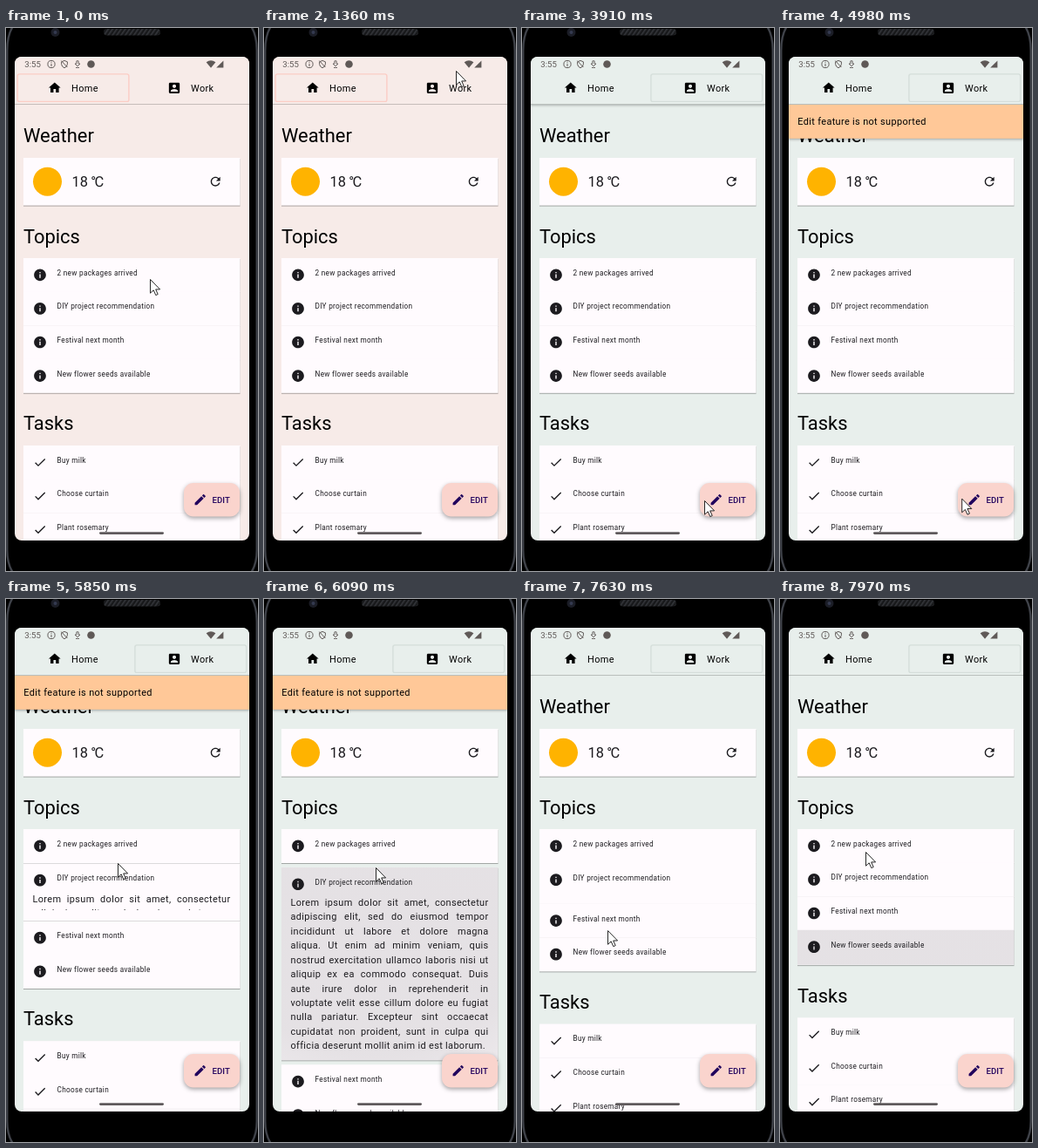
Recreate the animation shown at these times as an HTML page. Size 289 by 623 pixels, loop 8 s.

```html
<!DOCTYPE html>
<html lang="en">
<head>
<meta charset="utf-8">
<title>Phone screen</title>
<style>
html, body { margin: 0; width: 100%; height: 100%; overflow: hidden; background: #000; }
svg { display: block; }
#stage { width: 289px; height: 623px; }
text, .body { font-family: Roboto, "Noto Sans CJK JP", "Noto Sans CJK SC", "Noto Sans CJK", sans-serif; }
text { fill: #1c1b1f; }
.h { font-size: 21.9px; fill: #000; }
.tab { font-size: 10.95px; letter-spacing: .34px; fill: #000; }
.row { font-size: 8.21px; letter-spacing: .3px; }
.card { fill: #fffbfe; filter: drop-shadow(0 1px .7px rgba(0,0,0,.3)); }
.body { font-size: 10.95px; line-height: 16.43px; letter-spacing: .34px; color: #1c1b1f; width: 227px; }
.body div { height: 16.43px; text-align: justify; text-align-last: justify; }
.body div:last-child { text-align-last: left; white-space: nowrap; }
</style>
</head>
<body>
<svg id="stage" viewBox="0 0 289 623" xmlns="http://www.w3.org/2000/svg">
  <defs>
    <clipPath id="screen"><rect x="10" y="33" width="269" height="555" rx="8"/></clipPath>
    <clipPath id="below"><rect x="10" y="88" width="269" height="500"/></clipPath>
    <clipPath id="fabClip"><rect x="204" y="522" width="64" height="38.4" rx="11"/></clipPath>
    <radialGradient id="ink">
      <stop offset=".7" stop-color="#1c1b1f" stop-opacity=".115"/>
      <stop offset="1" stop-color="#1c1b1f" stop-opacity=".06"/>
    </radialGradient>
    <pattern id="mesh" width="4" height="4" patternUnits="userSpaceOnUse" patternTransform="rotate(35)">
      <rect width="4" height="4" fill="#17181a"/><rect width="1.6" height="4" fill="#34363a"/>
    </pattern>
  </defs>

  <rect width="289" height="623" fill="#000"/>
  <g fill="none" stroke="#3f4249" stroke-width="2.4">
    <path d="M8 -2C4 4 1.3 13 1.3 26V599C1.3 610 4 619 8 625"/>
    <path d="M281 -2C285 4 287.7 13 287.7 26V599C287.7 610 285 619 281 625"/>
  </g>
  <circle cx="56.5" cy="5" r="5" fill="#1b1d26"/>
  <circle cx="56.5" cy="5" r="2" fill="#343a50"/>
  <rect x="112" y="1" width="65" height="7.5" rx="3.7" fill="url(#mesh)"/>

  <g clip-path="url(#screen)">
    <rect id="bg" x="10" y="33" width="269" height="555"/>
    <g id="list"></g>
    <g clip-path="url(#below)">
      <g id="note">
        <rect x="10" y="87.5" width="269" height="39.3" fill="#ffc898" style="filter:drop-shadow(0 1.4px 1.4px rgba(0,0,0,.33))"/>
        <text class="tab" x="20.3" y="111">Edit feature is not supported</text>
      </g>
    </g>
    <rect id="bar" x="10" y="33" width="269" height="54.5"/>
    <rect x="10" y="87" width="269" height="1" fill="#000" opacity=".2"/>
    <rect id="mark" y="52.9" height="31.5" rx="2.2" fill="none" stroke-width="1.37"/>
    <g id="tabs"></g>
    <g fill="#5f5957">
      <text x="21.3" y="45" style="font-size:9.6px;fill:#5f5957">3:55</text>
      <g fill="none" stroke="#5f5957">
        <circle cx="52" cy="41.5" r="4.1"/>
        <path d="M52 40.8V44M52 38.8V39.8"/>
        <path d="M67 37.4L70.4 38.8V41.6Q70 44.6 67 45.8Q64 44.6 63.6 41.6V38.8ZM63.4 37.6L70.4 45"/>
        <path stroke-width=".9" d="M80.9 37.8H83.1V41H85L82 43.9L79 41H80.9ZM80 45.5H84"/>
      </g>
      <circle cx="97.5" cy="41.5" r="4.3"/>
      <path d="M229.6 39.2Q235 35.2 240.4 39.2L235 45.8Z"/>
      <path d="M241.2 45.6L249.4 37.4V45.6Z"/>
    </g>
    <g>
      <rect x="204" y="522" width="64" height="38.4" rx="11" fill="#fad4cd" style="filter:drop-shadow(0 2.8px 2.8px rgba(0,0,0,.36))"/>
      <g clip-path="url(#fabClip)"><circle id="fabInk" cx="212" cy="543" fill="url(#ink)"/></g>
      <g id="pen"></g>
      <text x="236.5" y="544.7" style="font-size:9.58px;font-weight:500;letter-spacing:.07px;fill:#21005d">EDIT</text>
    </g>
    <rect x="107" y="578.2" width="74" height="2.8" rx="1.4" fill="#5e595b"/>
  </g>
  <path id="cursor" d="M.5 .5V16.2L4.2 12.8L6.8 18.6L9.2 17.5L6.7 11.9H11.6Z" fill="#fff" stroke="#111" stroke-width=".9"/>
</svg>
<script>
const $ = id => document.getElementById(id);
const ICONS = {
  home: 'M10 20v-6h4v6h5v-8h3L12 3 2 12h3v8z',
  work: 'M3 5v14c0 1.1.89 2 2 2h14c1.1 0 2-.9 2-2V5c0-1.1-.9-2-2-2H5c-1.11 0-2 .9-2 2zm12 4c0 1.66-1.34 3-3 3s-3-1.34-3-3 1.34-3 3-3 3 1.34 3 3zm-9 8c0-2 4-3.1 6-3.1s6 1.1 6 3.1v1H6v-1z',
  info: 'M12 2C6.48 2 2 6.48 2 12s4.48 10 10 10 10-4.48 10-10S17.52 2 12 2zm1 15h-2v-6h2v6zm0-8h-2V7h2v2z',
  check: 'M9 16.17 4.83 12l-1.42 1.41L9 19 21 7l-1.41-1.41z',
  reload: 'M17.65 6.35C16.2 4.9 14.21 4 12 4c-4.42 0-7.99 3.58-7.99 8s3.57 8 7.99 8c3.73 0 6.84-2.55 7.73-6h-2.08c-.82 2.33-3.04 4-5.65 4-3.31 0-6-2.69-6-6s2.69-6 6-6c1.66 0 3.14.69 4.22 1.78L13 11h7V4l-2.35 2.35z',
  pen: 'M3 17.25V21h3.75L17.81 9.94l-3.75-3.75L3 17.25zM20.71 7.04c.39-.39.39-1.02 0-1.41l-2.34-2.34c-.39-.39-1.02-.39-1.41 0l-1.83 1.83 3.75 3.75 1.83-1.83z'
};
const LOREM = `Lorem ipsum dolor sit amet, consectetur
adipiscing elit, sed do eiusmod tempor
incididunt ut labore et dolore magna
aliqua. Ut enim ad minim veniam, quis
nostrud exercitation ullamco laboris nisi ut
aliquip ex ea commodo consequat. Duis
aute irure dolor in reprehenderit in
voluptate velit esse cillum dolore eu fugiat
nulla pariatur. Excepteur sint occaecat
cupidatat non proident, sunt in culpa qui
officia deserunt mollit anim id est laborum.`;
const TOPICS = ['2 new packages arrived', 'DIY project recommendation', 'Festival next month', 'New flower seeds available'];
const TASKS = ['Buy milk', 'Choose curtain', 'Plant rosemary'];
const LOOP = 8000, ROW = 38.6, GROW = 187.5, GAP = 5.5;
const LAP = .4; // cards overlap a little so that no seam shows between rows

const icon = (name, x, y, fill = '#1c1b1f') =>
  `<path fill="${fill}" transform="translate(${x - 8.21} ${y - 8.21}) scale(.6845)" d="${ICONS[name]}"/>`;
const label = (cls, x, y, s) => `<text class="${cls}" x="${x}" y="${y}">${s}</text>`;

// Rows are drawn relative to their own top edge.
const row = (s, name, inner = '') => `<g class="item">
  <rect class="card" x="20" width="248.5" height="${ROW + LAP}"/>${inner}
  ${icon(name, 39, 19.3)}${label('row', 58.5, 19.8, s)}</g>`;
const topicInner = `<svg class="clip" x="20" y="0" width="248.5" height="${ROW}" overflow="hidden">
    <circle class="ink" fill="url(#ink)"/></svg>
  <svg class="text" x="30.5" y="33.5" width="230" height="0" overflow="hidden">
    <foreignObject width="230" height="184"><div xmlns="http://www.w3.org/1999/xhtml" class="body">${
      LOREM.split('\n').map(s => `<div>${s}</div>`).join('')}</div></foreignObject></svg>`;

$('list').innerHTML = label('h', 20, 131.4, 'Weather') +
  '<rect class="card" x="20" y="149" width="248.5" height="54.6"/><circle cx="47.5" cy="176.2" r="16.5" fill="#ffb300"/>' +
  '<text x="75.5" y="182" style="font-size:16.4px">18 ℃</text>' + icon('reload', 240.2, 176.2) +
  label('h', 20, 246.8, 'Topics') +
  `<g id="topics">${TOPICS.map(s => row(s, 'info', topicInner)).join('')}</g>` +
  `<g id="tasks">${label('h', 20, 461.2, 'Tasks')}${TASKS.map(s => row(s, 'check')).join('')}</g>`;
$('tabs').innerHTML = icon('home', 55.8, 68.6, '#000') + label('tab', 75, 72.6, 'Home') +
  icon('work', 193, 68.8, '#000') + label('tab', 212, 72.6, 'Work');
$('pen').innerHTML = icon('pen', 222.7, 541.2, '#21005d');

const rows = [...$('topics').children].map(g => ({
  g, card: g.querySelector('.card'), clip: g.querySelector('.clip'),
  ink: g.querySelector('.ink'), text: g.querySelector('.text')
}));
[...$('tasks').querySelectorAll('.item')].forEach((g, i) =>
  g.setAttribute('transform', `translate(0 ${479 + i * ROW})`));

const set = (el, attrs) => { for (const k in attrs) el.setAttribute(k, attrs[k]); };
const clamp = v => Math.max(0, Math.min(1, v));
const mix = (a, b, p) => a + (b - a) * p;
const smooth = u => u * u * (3 - 2 * u);
const tint = (a, b, p) => `rgb(${a.map((v, i) => mix(v, b[i], p).toFixed(1))})`;

// Critically damped spring, 0 to 1, w in rad/s.
const spring = (ms, w) => {
  const x = Math.max(0, ms) / 1000 * w;
  return 1 - (1 + x) * Math.exp(-x);
};

// Cubic bezier easing solved by bisection.
const bezier = (x1, y1, x2, y2) => u => {
  const at = (a, b, s) => 3 * a * s * (1 - s) ** 2 + 3 * b * s * s * (1 - s) + s ** 3;
  let lo = 0, hi = 1;
  for (let i = 0; i < 24; i++) {
    const m = (lo + hi) / 2;
    if (at(x1, x2, m) < u) lo = m; else hi = m;
  }
  return at(y1, y2, lo);
};
const slowIn = bezier(0, 0, .2, 1), fastOut = bezier(.4, 0, 1, 1);

// Pointer stops: time, x, y.
const STOPS = [
  [0, 165, 288], [60, 161, 283], [535, 161, 283], [550, 159.5, 280.5], [720, 159.5, 280.5],
  [1180, 221, 42], [1360, 220, 49], [1880, 220, 49], [2410, 159, 91], [2650, 159, 95],
  [2860, 160, 188], [3000, 160, 188], [3150, 145, 230], [3610, 209, 542], [4940, 209, 542],
  [5640, 128, 303], [5860, 128, 303], [5960, 128, 308], [6770, 128, 308], [7050, 98, 582],
  [7240, 98, 582], [7860, 98, 290], [LOOP, 98, 290]
];
function pointer(t) {
  const i = STOPS.findIndex(s => s[0] > t), a = STOPS[i - 1], b = STOPS[i];
  const p = smooth((t - a[0]) / (b[0] - a[0]));
  return [mix(a[1], b[1], p), mix(a[2], b[2], p)];
}

function ripple(el, ms, from, to, x, y, hold) {
  const on = ms >= 0 && ms < hold + 220;
  set(el, {
    cx: x, cy: y, r: on ? mix(from, to, smooth(clamp(ms / 225))) : 0,
    opacity: clamp(ms / 75) * (1 - clamp((ms - hold) / 220))
  });
}

function draw(t) {
  const hue = spring(t - 1675, 38.7);
  const bg = tint([247, 235, 232], [232, 239, 236], hue);
  $('bg').setAttribute('fill', bg);
  $('bar').setAttribute('fill', bg);
  const left = mix(13.2, 147.9, spring(t - 1675, 7.07)), right = mix(140.9, 275.6, hue);
  set($('mark'), { x: left, width: right - left, stroke: tint([252, 205, 197], [213, 222, 218], hue) });

  const open = [0, spring(t - 5818, 20) - spring(t - 7385, 20), 0, spring(t - 7965, 20)];
  const shown = [false, t > 5818 && t < 7385, false, t > 7965];
  let y = 264;
  rows.forEach((r, i) => {
    const h = ROW + GROW * open[i];
    y += GAP * open[i];
    r.g.setAttribute('transform', `translate(0 ${y})`);
    r.card.setAttribute('height', h + LAP);
    r.clip.setAttribute('height', h);
    r.text.setAttribute('height', Math.max(0, h - 45));
    r.text.style.display = shown[i] && h > 45 ? '' : 'none';
    y += h + GAP * open[i];
  });
  $('tasks').setAttribute('transform', `translate(0 ${y - 264 - 4 * ROW})`);
  ripple(rows[1].ink, t - 5850, 20, 290, 108, 12, 300);
  ripple(rows[3].ink, t - 7760, 20, 230, 95, 18, 300);
  ripple($('fabInk'), t - 3910, 6, 75, 212, 543, 120);

  const slide = t < 6775 ? slowIn(clamp((t - 3912) / 150)) : 1 - fastOut(clamp((t - 6775) / 250));
  $('note').setAttribute('transform', `translate(0 ${-39.3 * (1 - slide)})`);
  $('note').style.display = t >= 3905 && t < 7025 ? '' : 'none';

  const [px, py] = pointer(t);
  $('cursor').setAttribute('transform', `translate(${px} ${py})`);
}

const start = performance.now();
function tick() {
  draw((performance.now() - start) % LOOP);
  requestAnimationFrame(tick);
}
tick();
</script>
</body>
</html>
```
